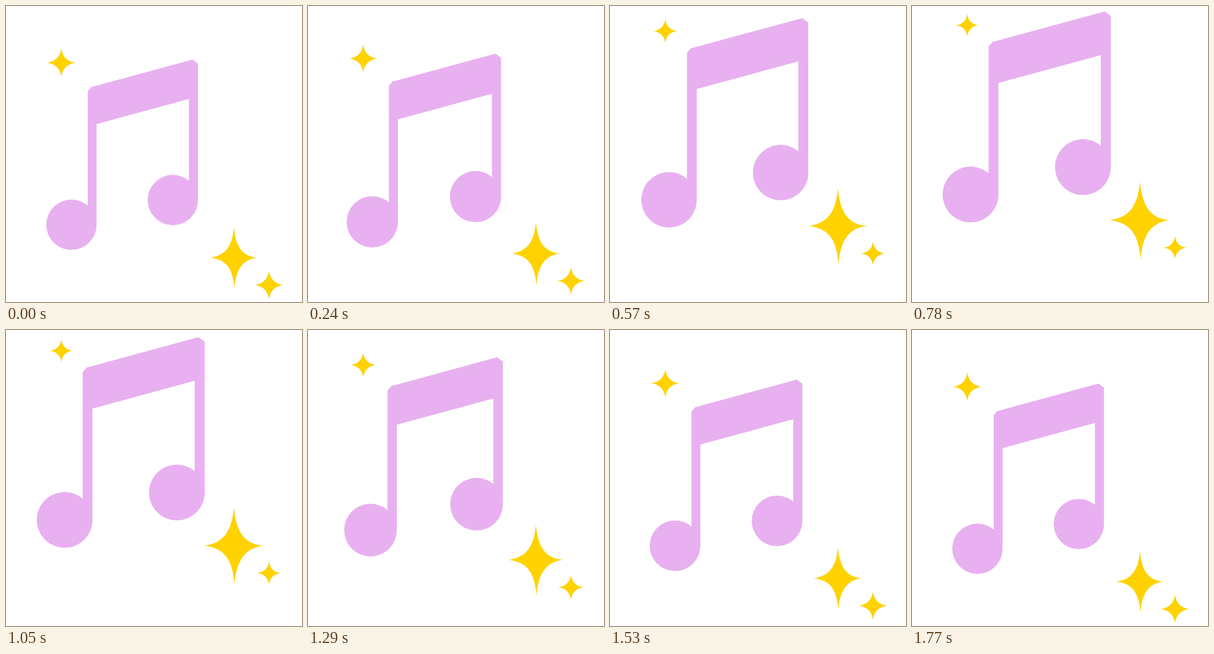
Recreate the animation shown at these times as an HTML page. Size 500 px wide and 500 px high, loop 1800 ms.

```html
<!DOCTYPE html>
<html lang="en">
<head>
<meta charset="utf-8">
<title>Music note</title>
<style>
  html, body { margin: 0; width: 100%; height: 100%; overflow: hidden; background: #fff; }
  svg { display: block; width: 100%; height: 100%; }
</style>
</head>
<body>
<svg viewBox="0 0 500 500">
  <defs>
    <path id="spark" d="M0-24C2-10 10-2 24 0C10 2 2 10 0 24C-2 10-10 2-24 0C-10-2-2-10 0-24Z"/>
  </defs>
  <g id="note" fill="#e8b0f0">
    <path d="M138 144L144 137L315 90.5L324.3 97.5V327.7H309V157L153 199.5V369.5H138Z"/>
    <circle cx="110.5" cy="369.5" r="42.5"/>
    <circle cx="281.8" cy="327.7" r="42.5"/>
  </g>
  <g fill="#ffd200">
    <path id="big" d="M385 374C388 405 398 423 424.5 425C400 428 388 445 386 477.5C383 445 374 429 345.5 425C372 421 382 405 385 374Z"/>
    <use id="upper" href="#spark" x="93.3" y="95.7"/>
    <use id="lower" href="#spark" x="444.2" y="471.3"/>
  </g>
</svg>
<script>
const LOOP = 1800, STEP = 30, RISE = 63.6;

// Cubic Bezier easing with handles (a, 0) and (b, 1).
function ease(p, a, b) {
  if (p <= 0) return 0;
  if (p >= 1) return 1;
  let lo = 0, hi = 1;
  for (let i = 0; i < 24; i++) {
    const u = (lo + hi) / 2, v = 1 - u;
    if (3 * v * v * u * a + 3 * v * u * u * b + u * u * u < p) lo = u; else hi = u;
  }
  return lo * lo * (3 - 2 * lo);
}

// Goes from 0 to 1 by `top`, then back to 0 between `leave` and `end`.
function swing(t, top, leave, end, a, b) {
  return ease(t / top, a, b) - ease((t - leave) / (end - leave), a, b);
}

function place(id, x, y, dy, scale) {
  document.getElementById(id).setAttribute("transform",
    `translate(${x} ${y - dy}) scale(${scale}) translate(${-x} ${-y})`);
}

function draw(time) {
  const t = Math.floor(time % LOOP / STEP) * STEP;
  const lift = swing(t, 850, 875, 1760, 0.6, 0.4);
  const swell = swing(t, 855, 940, 1770, 0.557, 0.168);
  const glow = swing(t, 820, 875, 1780, 0.57, 0.4);
  const dy = RISE * lift;
  place("note", 218, 258, dy, 1 + 0.109 * swell);
  place("big", 385, 425.5, dy, 1 + 0.27 * glow);
  place("upper", 93.3, 95.7, dy, 1 - 0.21 * lift);
  place("lower", 444.2, 471.3, dy, 1 - 0.2 * lift);
}

const start = performance.now();
function tick() {
  draw(performance.now() - start);
  requestAnimationFrame(tick);
}
tick();
</script>
</body>
</html>
```
